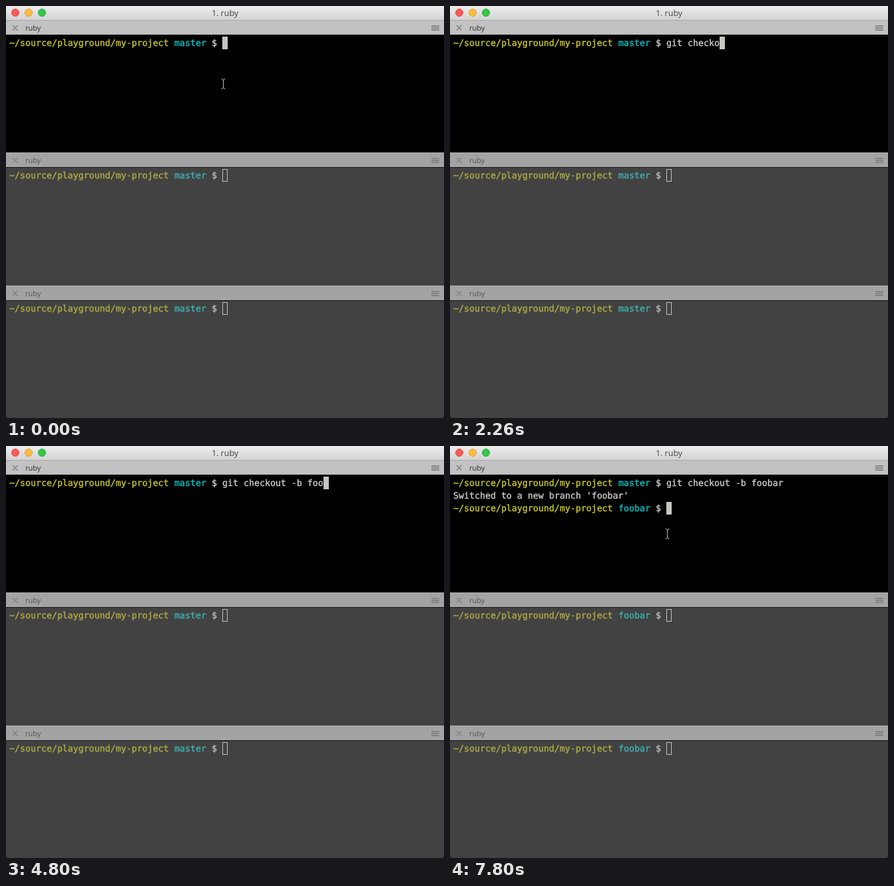
These frames come from a looping animation (658x619 px, 8 s). An HTML page:

```html
<!DOCTYPE html>
<html lang="en">
<head>
<meta charset="utf-8">
<title>Terminal panes</title>
<style>
  html, body { margin: 0; width: 100%; height: 100%; overflow: hidden; background: #000; }
  svg { display: block; width: 658px; height: 619px; }
  text { white-space: pre; text-rendering: geometricPrecision; }
  .ui { font: 11px "Open Sans", sans-serif; }
  .term { font: 13.289px "DejaVu Sans Mono", monospace; stroke-width: .4; }
</style>
</head>
<body>
<svg id="stage" viewBox="0 0 658 619"></svg>
<script>
const LOOP = 8000, CELL = 8, LEFT = 5, PROMPT = 40;
const COMMAND = 'git checkout -b foobar';
const KEYS = [1060, 1150, 1260, 1360, 1500, 1600, 1660, 2100, 2160, 2230, 2300,
  2360, 2600, 2690, 2780, 2860, 4600, 4700, 4800, 4900, 5500, 5760];
const ENTER = 6330, OUTPUT = 6390, READY = 6440;

const bright = { path: '#c8c625', branch: '#00c3c4', text: '#c9c9c9' };
const dim = { path: '#afad45', branch: '#3fb1b1', text: '#b8b8b8' };

const rect = (x, y, w, h, fill, extra = '') =>
  `<rect x="${x}" y="${y}" width="${w}" height="${h}" fill="${fill}" ${extra}/>`;

const term = (col, y, fill, str, extra = '') =>
  `<text class="term" x="${LEFT + col * CELL}" y="${y}" fill="${fill}" stroke="${fill}" ${extra}>${str}</text>`;

const prompt = (y, c, branch) =>
  term(0, y, c.path, '~/source/playground/my-project') +
  term(31, y, c.branch, branch, 'data-branch') +
  term(38, y, c.text, '$');

function header(y, fill, ink, mark, id) {
  const m = y + 11;
  return rect(0, y, 658, 21, fill) +
    `<path d="M10 ${m - 4}l7.5 7.5m0-7.5l-7.5 7.5" stroke="${mark}" stroke-width="1.6"/>` +
    `<text class="ui" id="${id}" x="29" y="${m + 4}" fill="${ink}">ruby</text>` +
    [-4, -1, 2].map(d => rect(639, m + d, 12, 2, mark)).join('');
}

function idlePane(y, id) {
  return rect(0, y, 658, 200, '#424242') +
    rect(0, y, 658, 1, '#adadad') +
    header(y + 1, '#a3a3a3', '#555', '#848484', id) +
    rect(0, y + 22, 658, 1, '#161616') +
    prompt(y + 39, dim, 'master') +
    rect(325.5, y + 25.5, 7, 18, 'none', 'stroke="#c0c0bc"');
}

const lights = [['#fc5b57', '#e2463f'], ['#fdbc40', '#dfa033'], ['#34c84a', '#27aa35']]
  .map(([fill, edge], i) =>
    `<circle cx="${14 + 20 * i}" cy="10" r="5.5" fill="${fill}" stroke="${edge}"/>`).join('');

const stage = document.getElementById('stage');
stage.innerHTML = `
  <defs><linearGradient id="bar" x2="0" y2="1">
    <stop stop-color="#ededed"/><stop offset="1" stop-color="#d3d3d3"/>
  </linearGradient></defs>
  ${rect(0, 0, 658, 21, 'url(#bar)')}${rect(0, 21, 658, 1, '#aaa')}${lights}
  <text class="ui" id="title" x="329" y="15" fill="#444" text-anchor="middle" style="font-size:12.5px">1. ruby</text>
  ${header(22, '#c2c2c2', '#2b2b2b', '#858585', 'job')}
  ${prompt(60, bright, 'master')}
  ${term(PROMPT, 60, bright.text, '', 'id="typed"')}
  <g id="output">${term(0, 79, bright.text, "Switched to a new branch 'foobar'")}</g>
  <g id="next">${prompt(98, bright, 'foobar')}</g>
  ${rect(0, 46, 8, 19, '#c5c5c1', 'id="caret"')}
  <path id="mouse" fill="none" stroke="#b8b8b8"
    d="M323.5-7.5q3 0 3 2.5V5q0 2.5-3 2.5M329.5-7.5q-3 0-3 2.5M326.5 5q0 2.5 3 2.5"/>
  ${idlePane(220, 'job2')}${idlePane(420, 'job3')}
  <path d="M0 616v3h3q-3 0-3-3M658 616v3h-3q3 0 3-3" fill="#000"/>`;

const [title, job, typed, output, next, caret, mouse] =
  ['title', 'job', 'typed', 'output', 'next', 'caret', 'mouse']
    .map(id => document.getElementById(id));
// The first two branch labels belong to the active pane.
const idleBranches = [...stage.querySelectorAll('[data-branch]')].slice(2);
const show = (el, on) => el.setAttribute('visibility', on ? 'visible' : 'hidden');
const within = (t, a, b) => t >= a && t < b;

function draw(t) {
  const count = KEYS.filter(k => k <= t).length;
  typed.textContent = COMMAND.slice(0, count);
  job.textContent = within(t, 5660, 5800) ? 'sed' : within(t, ENTER, READY) ? 'git' : 'ruby';
  title.textContent = within(t, 5730, 5830) ? '1. sed' : within(t, OUTPUT, 6500) ? '1. git' : '1. ruby';

  show(output, t >= OUTPUT);
  show(next, t >= READY);
  idleBranches.forEach(b => b.textContent = t >= READY ? 'foobar' : 'master');

  const row = t >= OUTPUT ? 2 : t >= ENTER ? 1 : 0;
  const col = t >= READY ? PROMPT : t >= ENTER ? 0 : PROMPT + count;
  caret.setAttribute('x', LEFT + col * CELL);
  caret.setAttribute('y', 46 + row * 19);

  const p = Math.min(1, Math.max(0, (t - 7530) / 270));
  show(mouse, t < KEYS[0] || t >= 7530);
  mouse.setAttribute('transform', `translate(0 ${117 + Math.round(15 * p * p * (3 - 2 * p))})`);
}

const start = performance.now();
function tick(now) {
  draw(Math.max(0, now - start) % LOOP);
  requestAnimationFrame(tick);
}
draw(0);
requestAnimationFrame(tick);
</script>
</body>
</html>
```
